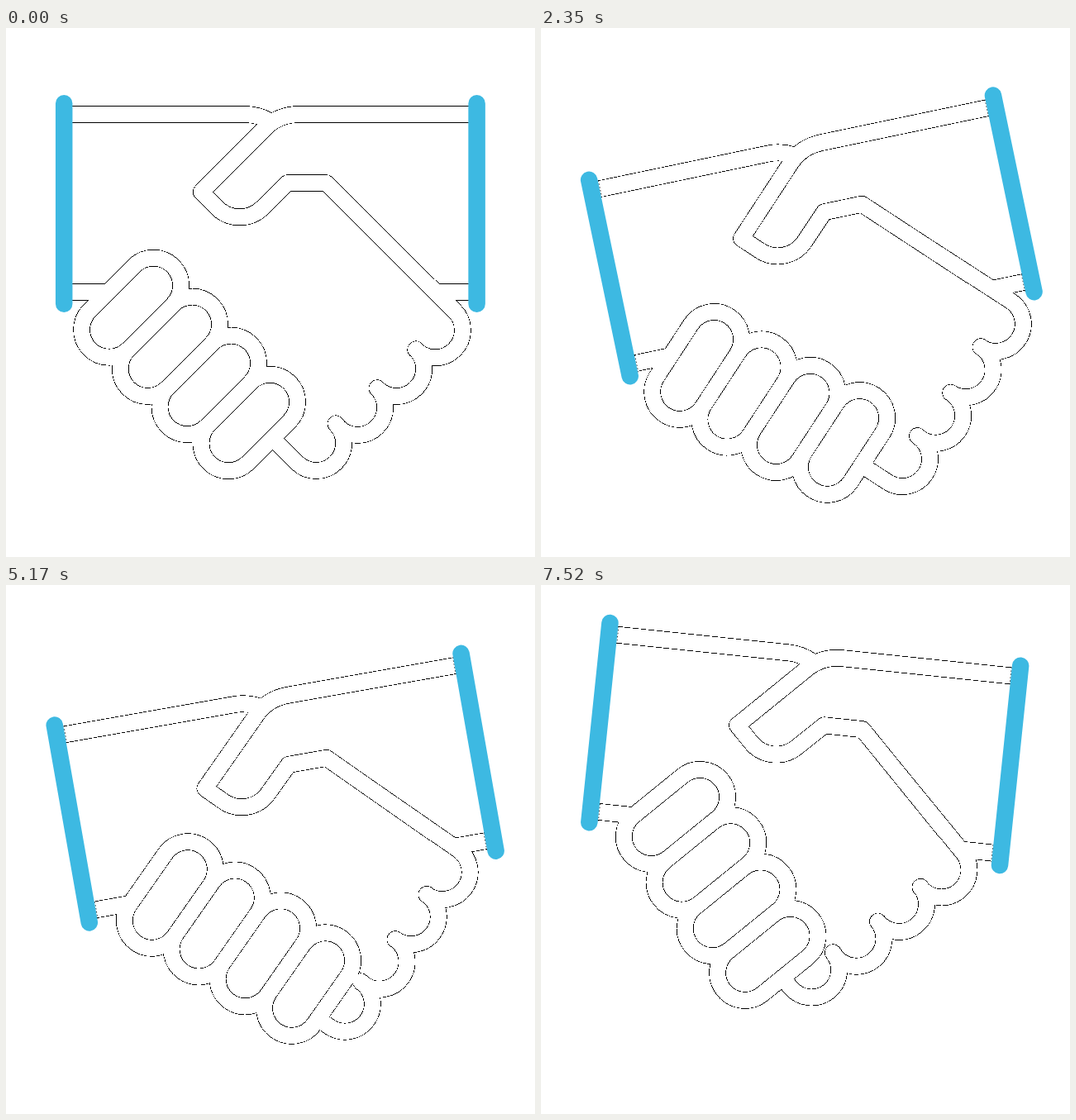
An HTML page for the animation above (7.99 s loop, 640 px wide and 640 px high).

```html
<!DOCTYPE html>
<html lang="en">
<head>
<meta charset="utf-8">
<title>Handshake</title>
<style>
  html, body { margin: 0; width: 100%; height: 100%; overflow: hidden; background: #fff; }
  svg { display: block; width: 100vw; height: 100vh; }
  .line { fill: none; stroke-linejoin: round; shape-rendering: crispEdges; }
  .ink { stroke: #000; stroke-width: 20.7; }
  .paper { stroke: #fff; stroke-width: 19.3; }
  .dash { stroke: #000; stroke-width: .8; stroke-dasharray: 1.5 2.5; }
  .dark { fill: #000; }
  .light { fill: #fff; }
  .bar { stroke: #3db9e2; stroke-width: 20.5; stroke-linecap: round; }
</style>
</head>
<body>
<svg viewBox="0 0 640 640"><g id="shake"></g></svg>
<script>
const NS = 'http://www.w3.org/2000/svg';
const shake = document.getElementById('shake');
const STEP = 470, LOOP = 7990;
const R = 33.25, K = Math.SQRT1_2;

// Tilt of the whole handshake at each step, in degrees
const tilt = [0, -.55, -2.2, -5.1, -8.23, -11.8, -14.7, -16.4, -17,
  -16.15, -13.8, -10, -5.2, -.75, 3.15, 5.45, 5.95];

// Centre and half length of each left finger
const fingers = [
  [151.6, 338.2, 37.9], [198.4, 385.3, 38.1],
  [245.8, 431.9, 37.5], [294.3, 477.5, 35.4]
];
// Centres of the right finger tips
const tips = [[519.2, 365.6], [472.4, 412.3], [425.4, 459.2], [375.4, 502.3]];

const armPath = 'M80 104.5H289C300 104.5 309 107 319 112.5' +
  'M560 104.5H355C339 104.5 326 109 314.5 120L236.2 198.3L254.8 217' +
  'A39 39 0 0 0 310.4 217.4L340.8 187.5H387.3L500 300.2' +
  'M80 319.8H124M560 319.8H520';

function makeTipPath() {
  const e = R * K;
  const arcs = tips.map(([x, y]) =>
    `L${x + e} ${y - e}A${R} ${R} 0 0 1 ${x - e} ${y + e}`);
  return 'M447.3 247.5' + arcs.join('') + 'L322.4 496.4';
}

function add(tag, attrs, parent = shake) {
  const el = document.createElementNS(NS, tag);
  for (const k in attrs) el.setAttribute(k, attrs[k]);
  parent.appendChild(el);
  return el;
}

const tipParts = [];
const fingerParts = fingers.map(() => []);

function addArms(kind) {
  add('path', { d: armPath, class: 'line ' + kind });
  tipParts.push(add('path', { d: makeTipPath(), class: 'line ' + kind }));
}

function addFingers(kind, r) {
  fingers.forEach(([x, y, half], i) => {
    const g = add('g', {});
    add('rect', {
      x: -half - r, y: -r, width: 2 * (half + r), height: 2 * r, rx: r,
      transform: `translate(${x} ${y}) rotate(-45)`, class: 'line ' + kind
    }, g);
    fingerParts[i].push(g);
  });
}

addArms('ink');
addFingers('ink light', R);
addArms('paper');
addFingers('paper', R);
addFingers('dark', R - 9.65);
addFingers('light', R - 10.35);

const ends = add('path', {
  d: 'M81 94V115M81 310V331M559 94V115M559 310V331', class: 'line dash'
});
add('path', { d: 'M70.2 91.2V333.8M569.6 91.2V333.8', class: 'bar' });

const ease = x => (1 - Math.cos(Math.PI * Math.min(1, Math.max(0, x)))) / 2;

// Slide out and back, with a short rest at the far end
function slide(t, start, time, rest, size) {
  const out = ease((t - start) / time);
  const back = ease((t - start - time - rest) / time);
  return size * (out - back) * K;
}

function draw(t) {
  const step = Math.floor(t / STEP);
  const now = step * STEP;
  shake.setAttribute('transform', `rotate(${tilt[step]} 512 196)`);
  ends.setAttribute('visibility', step ? 'visible' : 'hidden');

  const s = slide(now, 950, 5500, 135, 28.8);
  tipParts.forEach(p => p.setAttribute('transform', `translate(${-s} ${-s})`));

  fingerParts.forEach((parts, i) => {
    const d = slide(now, 150 + 610 * (3 - i), 4400, 180, 35);
    parts.forEach(p => p.setAttribute('transform', `translate(${d} ${-d})`));
  });
}

const begin = performance.now();
function tick() {
  draw((performance.now() - begin) % LOOP);
  requestAnimationFrame(tick);
}
tick();
</script>
</body>
</html>
```
